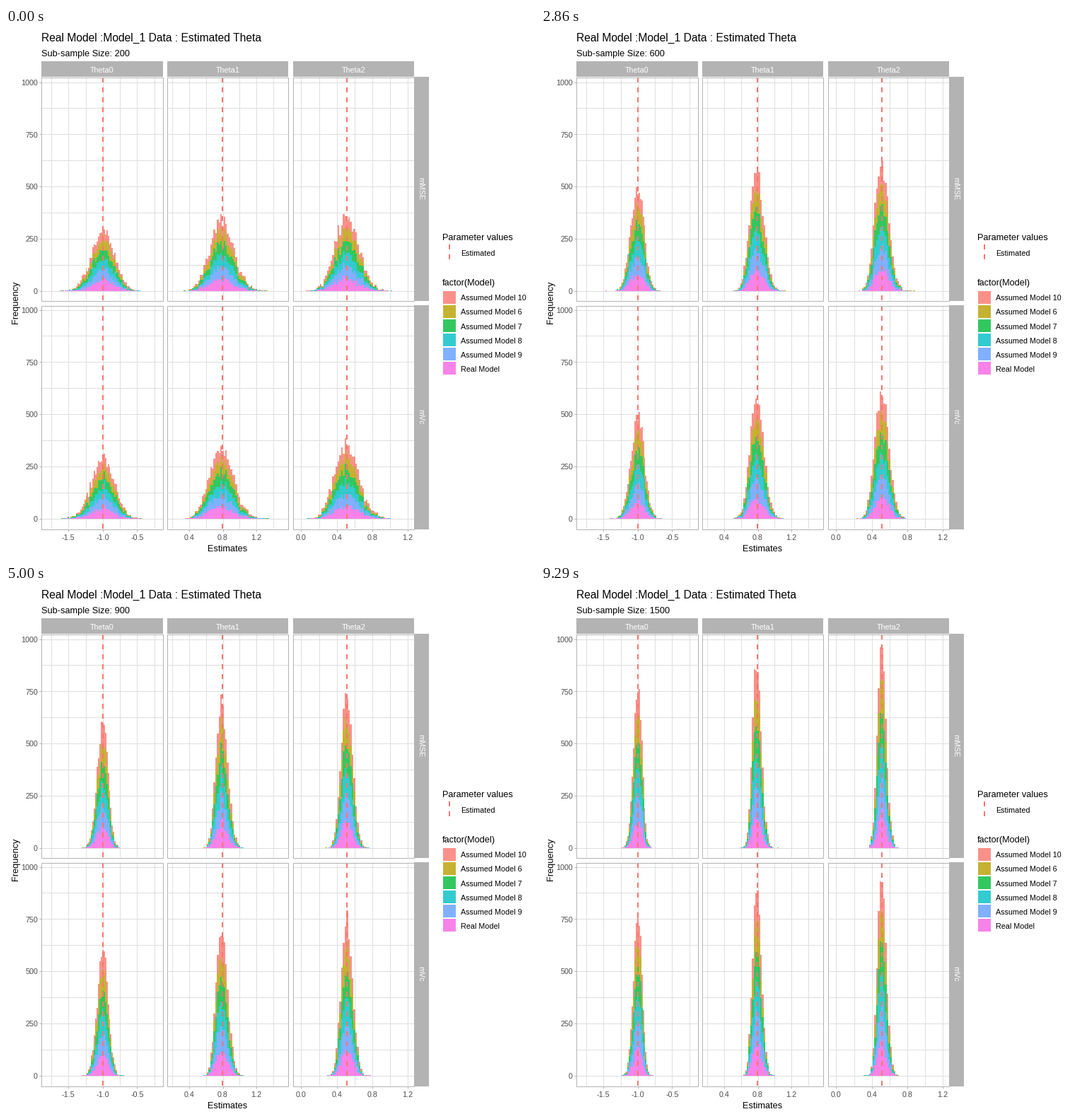
Recreate the animation shown at these times as a matplotlib script. Size 748 by 748 pixels, loop 10 s.

```python
import numpy as np
import matplotlib.pyplot as plt
from matplotlib.animation import FuncAnimation
from matplotlib.collections import LineCollection
from matplotlib.patches import Rectangle

plt.rcParams["font.family"] = "Liberation Sans"

SIDE, DPI = 748, 100
PX = 72 / DPI
GREY, GRID, RED = "#B3B3B3", "#DEDEDE", "#F8766D"
BIG, MID, SMALL = 15.6, 12.75, 10.8

MODELS = [("Assumed Model 10", "#F8766D"), ("Assumed Model 6", "#B79F00"),
          ("Assumed Model 7", "#00BA38"), ("Assumed Model 8", "#00BFC4"),
          ("Assumed Model 9", "#619CFF"), ("Real Model", "#F564E3")]
SIZES = range(200, 1600, 100)
LOOP, FRAMES = 10000, 200
DRAWS = 1000
BIN = 0.02
PER_COUNT = 0.2949

# left, right, pixel of zero, pixels per unit, truth, spread at n=200, skew, ticks, grid step
COLS = [
    dict(name="Theta0", x0=50, x1=222, zero=233.8, unit=97.0, mu=-1.0, sd=0.168,
         skew=-0.015, ticks=(-1.5, -1.0, -0.5), step=0.25),
    dict(name="Theta1", x0=228, x1=399, zero=211.4, unit=118.9, mu=0.792, sd=0.143,
         skew=0.03, ticks=(0.4, 0.8, 1.2), step=0.2),
    dict(name="Theta2", x0=406, x1=577, zero=417.5, unit=125.2, mu=0.517, sd=0.1355,
         skew=0.025, ticks=(0.0, 0.4, 0.8, 1.2), step=0.2),
]
ROWS = [dict(name="mMSE", top=69, bottom=385, base=372),
        dict(name="mVc", top=392, bottom=708, base=694)]

fig = plt.figure(figsize=(SIDE / DPI, SIDE / DPI), dpi=DPI, facecolor="white")
ax = fig.add_axes([0, 0, 1, 1])
ax.set_xlim(0, SIDE)
ax.set_ylim(SIDE, 0)
ax.axis("off")

grid, marks = [], []


def label(x, y, s, size, color="black", ha="left", rot=0):
    return ax.text(x, y, s, fontsize=size * PX, color=color, ha=ha, va="baseline",
                   rotation=rot, rotation_mode="anchor", zorder=6)


def add_lines(segments, color, z):
    ax.add_collection(LineCollection(segments, colors=color, linewidths=PX,
                                     zorder=z, snap=True), autolim=False)


def box(x, y, w, h, color, alpha=1):
    ax.add_patch(Rectangle((x, y), w, h, fc=color, lw=0, alpha=alpha, zorder=5))


def dashed(x, y0, y1):
    ax.plot([x, x], [y1, y0], color=RED, lw=2 * PX, zorder=4,
            dashes=(3.5, 3.5), dash_capstyle="butt")


def draw_panel(col, row):
    x0, x1, top, bottom = col["x0"], col["x1"], row["top"], row["bottom"]
    for k in range(-8, 8):
        x = col["zero"] + k * col["step"] * col["unit"]
        if x0 < x < x1:
            grid.append([(x, top), (x, bottom)])
    for count in range(0, 1001, 125):
        y = row["base"] - 0.5 - count * PER_COUNT
        grid.append([(x0, y), (x1, y)])
    dashed(round(col["zero"] + col["mu"] * col["unit"]), top, bottom)
    ax.add_patch(Rectangle((x0 + 0.5, top + 0.5), x1 - x0 - 0.5, bottom - top,
                           fill=False, ec=GREY, lw=PX, zorder=4.5))


def bin_edges(col):
    first = np.floor((col["x0"] - col["zero"]) / col["unit"] / BIN) + 1.5
    last = np.floor((col["x1"] - col["zero"]) / col["unit"] / BIN)
    return np.arange(first, last) * BIN


def stack(col, n, seed):
    """Cumulative bar heights in whole pixels, bottom layer first."""
    rng = np.random.default_rng(seed)
    z = rng.standard_normal((len(MODELS), DRAWS))
    x = col["mu"] + col["sd"] * np.sqrt(200 / n) * (z + col["skew"] * (z * z - 1))
    counts = [np.histogram(v, col["edges"])[0] for v in x]
    total = np.cumsum(counts, axis=0)
    high = np.maximum(np.round(total * PER_COUNT), total > 0)
    return np.vstack([np.zeros(len(col["edges"]) - 1), high])


# titles and axes
label(50.5, 19, "Real Model :Model_1 Data : Estimated Theta", BIG)
subtitle = label(50.5, 39.5, "", MID)
label(313.5, 740, "Estimates", MID, ha="center")
label(17.5, 388, "Frequency", MID, ha="center", rot=90)

for col in COLS:
    col["edges"] = bin_edges(col)
    box(col["x0"], 47, col["x1"] - col["x0"] + 0.5, 22, GREY)
    label((col["x0"] + col["x1"]) / 2, 63, col["name"], SMALL, "white", "center")
    for t in col["ticks"]:
        x = col["zero"] + t * col["unit"]
        marks.append([(x, 709), (x, 712)])
        label(x, 724, f"{t:.1f}", SMALL, "#4D4D4D", "center")

for row in ROWS:
    mid = (row["top"] + row["bottom"]) / 2
    box(577, row["top"], 21, row["bottom"] - row["top"] + 0.5, GREY)
    label(583.5, mid, row["name"], SMALL, "white", "center", 270)
    for count in range(0, 1001, 250):
        y = row["base"] - 0.5 - count * PER_COUNT
        marks.append([(47, y), (50, y)])
        label(45, y + 4.2, str(count), SMALL, "#4D4D4D", "right")

# legend
label(617, 299.5, "Parameter values", MID)
dashed(627, 306, 326.5)
label(643, 321.5, "Estimated", SMALL)
label(617, 363.5, "factor(Model)", MID)
for i, (name, color) in enumerate(MODELS):
    y = 371.5 + 20.1 * i
    box(618, y, 18.3, 18.3, color, 0.8)
    label(643, y + 13.8, name, SMALL)

# histogram layers
panels = []
for r, row in enumerate(ROWS):
    for c, col in enumerate(COLS):
        draw_panel(col, row)
        px_edges = np.round(col["zero"] + col["edges"] * col["unit"])
        flat = np.full(len(px_edges) - 1, float(row["base"]))
        layers = [ax.stairs(flat, px_edges, baseline=flat, fill=True, color=color,
                            alpha=0.8, lw=0, antialiased=False, zorder=3)
                  for _, color in reversed(MODELS)]
        heights = [stack(col, n, [7, r, c, n]) for n in SIZES]
        panels.append((row["base"], px_edges, layers, heights))

add_lines(grid, GRID, 1)
add_lines(marks, GREY, 4)
ax.set_xlim(0, SIDE)
ax.set_ylim(SIDE, 0)


def draw(frame):
    # a step that falls inside a frame's time shows from that frame on
    i = (frame + 1) * len(SIZES) // FRAMES % len(SIZES)
    if frame == FRAMES - 1:
        i = len(SIZES) - 1
    subtitle.set_text(f"Sub-sample Size: {SIZES[i]}")
    for base, edges, layers, heights in panels:
        ys = base - heights[i]
        for k, layer in enumerate(layers):
            layer.set_data(ys[k + 1], edges, ys[k])
    return [subtitle]


anim = FuncAnimation(fig, draw, frames=FRAMES, interval=LOOP / FRAMES,
                     repeat=True, repeat_delay=0, blit=False)
plt.show()
```
